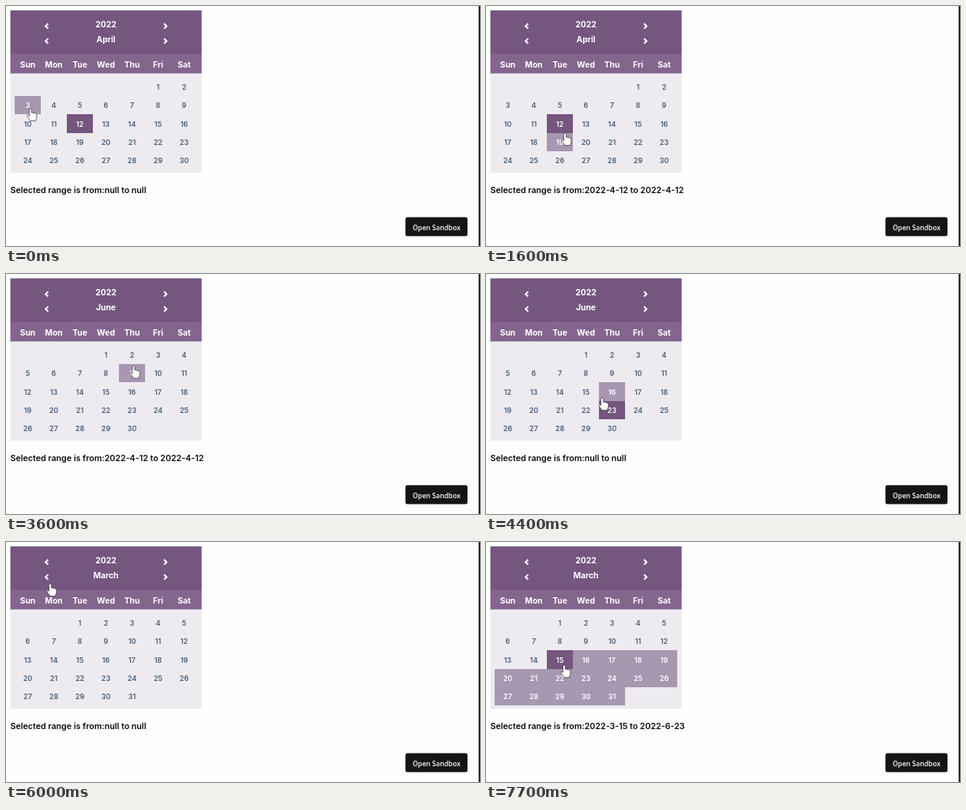
Write an HTML page that moves like this. It is 600 by 304 pixels and loops after 8 s.

```html
<!DOCTYPE html>
<html lang="en">
<head>
<meta charset="utf-8">
<title>Date range picker</title>
<style>
  html, body { margin: 0; width: 100%; height: 100%; overflow: hidden; background: #fefefe; }
  svg { display: block; width: 100%; height: 100%; }
  text { font-family: Inter, "Open Sans", sans-serif; font-weight: 600; }
  .mid { text-anchor: middle; }
  .head { font-size: 10.3px; font-weight: 700; fill: #fff; }
  .day { font-size: 9px; fill: #435f7c; }
  .day.on { fill: #fff; }
  .button { font: 600 8.6px "Open Sans", "Noto Sans", sans-serif; fill: #fff; }
</style>
</head>
<body>
<svg id="stage" viewBox="0 0 600 304"></svg>
<script>
const LOOP = 8000, STEP = 100, YEAR = 2022;
const COL = 33, ROW = 23.1, LEFT = 11, TOP = 91.2;
const DARK = '#74567f', LILAC = '#a797b1';

const date = (month, day) => new Date(YEAR, month - 1, day);
const TODAY = date(4, 12);

// Clicks on the month arrows: time and direction.
const turns = [[2700, 1], [2900, 1], [5300, -1], [5700, -1], [6000, -1]];

// Clicks on days: every second one completes a range.
const picks = [
  [1100, TODAY], [1300, TODAY], [4100, date(6, 23)], [6800, date(3, 15)]
];

// Pointer moves: start, duration, destination.
const home = [31, 130];
const moves = [
  [100, 500, 97, 153], [1500, 100, 100, 161], [1600, 500, 218, 89], [2100, 300, 203, 47],
  [3300, 300, 161.5, 116.5], [3600, 200, 156, 162], [4200, 200, 147, 157],
  [4400, 600, 56, 53], [6100, 300, 99, 156]
];

const stage = document.getElementById('stage');

function add(tag, attrs, content) {
  const el = document.createElementNS('http://www.w3.org/2000/svg', tag);
  for (const key in attrs) el.setAttribute(key, attrs[key]);
  if (content !== undefined) el.textContent = content;
  return stage.appendChild(el);
}
const rect = (x, y, width, height, fill, more) => add('rect', { x, y, width, height, fill, ...more });
const label = (x, y, cls, content) => add('text', { x, y, class: cls }, content);

rect(598.4, 0, 1.6, 304, '#0c0c0c');
rect(5.5, 5.5, 242.2, 55.5, DARK);
rect(5.5, 60.7, 242.2, 25, '#83658d');
rect(5.5, 85.6, 242.2, 125.7, '#eeebf0');

for (const y of [25.4, 44.4])
  for (const side of [-1, 1]) {
    const x = 126.7 + side * 76.6, back = x - side * 3.3;
    add('path', {
      d: `M${back} ${y - 3.1}L${x} ${y}L${back} ${y + 3.1}`,
      fill: 'none', stroke: '#fff', 'stroke-width': 2
    });
  }

label(126.5, 27.2, 'mid head', YEAR);
const monthLabel = label(126.5, 46.1, 'mid head');
['Sun', 'Mon', 'Tue', 'Wed', 'Thu', 'Fri', 'Sat'].forEach((name, i) =>
  label(LEFT + COL * (i + .5), 77.7, 'mid head', name));

const cells = Array.from({ length: 35 }, (_, i) => {
  const x = LEFT + COL * (i % 7), y = TOP + ROW * Math.floor(i / 7);
  return {
    x, y,
    box: rect(x, y, COL, ROW, 'none', { 'shape-rendering': 'crispEdges' }),
    text: label(x + COL / 2, y + ROW / 2 + 3.6)
  };
});

const status = add('text', { x: 5.5, y: 236.8, 'font-size': 10.66, fill: '#0c0c0e' });

rect(505.6, 267.6, 78.6, 23.9, '#151515', { rx: 2.5 });
label(545, 283.8, 'mid button', 'Open Sandbox');

const hand = add('path', {
  d: 'M-1.6 1.2Q-1.5 0 0 0Q1.4 0 1.5 1.3V5.2Q3 4.4 4 5.7Q5.4 5.1 6 6.4' +
     'Q7.8 6 7.9 7.8V11Q7.8 13 6.6 14.2V15.6H-.4V14.6Q-2 13 -4 9.9Q-4.4 8.6 -3.4 8.2Q-2.4 8.2 -1.6 9.4Z',
  fill: '#fff', stroke: '#45404b', 'stroke-width': .8, 'stroke-linejoin': 'round'
});

function pointerAt(t) {
  let [x, y] = home;
  for (const [start, duration, toX, toY] of moves) {
    const p = Math.min(1, Math.max(0, (t - start) / duration));
    x += (toX - x) * p;
    y += (toY - y) * p;
  }
  return [x, y];
}

function rangeAt(t) {
  const done = picks.filter(p => p[0] <= t).map(p => p[1]);
  const lone = done.length % 2 ? done.pop() : null;
  if (lone) return [lone];
  return done.slice(-2).sort((a, b) => a - b);
}

const show = d => d ? `${YEAR}-${d.getMonth() + 1}-${d.getDate()}` : 'null';

function draw(time) {
  const t = Math.floor(time / STEP) * STEP;
  const month = turns.reduce((m, [start, dir]) => start <= t ? m + dir : m, 4);
  const [px, py] = pointerAt(t);
  const [from, to] = rangeAt(t);
  const first = date(month, 1).getDay();
  const count = date(month + 1, 0).getDate();

  monthLabel.textContent = date(month, 1).toLocaleString('en', { month: 'long' });
  cells.forEach(({ x, y, box, text }, i) => {
    const n = i - first + 1, day = date(month, n);
    const valid = n > 0 && n <= count;
    const hover = px >= x && px < x + COL && py >= y && py < y + ROW;
    const picked = [TODAY, from, to].some(d => d && +d === +day);
    const within = to && day > from && day < to;
    const fill = !valid ? 'none' : picked ? DARK : hover || within ? LILAC : 'none';
    box.setAttribute('fill', fill);
    text.setAttribute('class', fill === 'none' ? 'mid day' : 'mid day on');
    text.textContent = valid ? n : '';
  });
  status.textContent = `Selected range is from:${show(to && from)} to ${show(to)}`;
  hand.setAttribute('transform', `translate(${px} ${py})`);
}

const start = performance.now();
function tick() {
  draw((performance.now() - start) % LOOP);
  requestAnimationFrame(tick);
}
tick();
</script>
</body>
</html>
```
